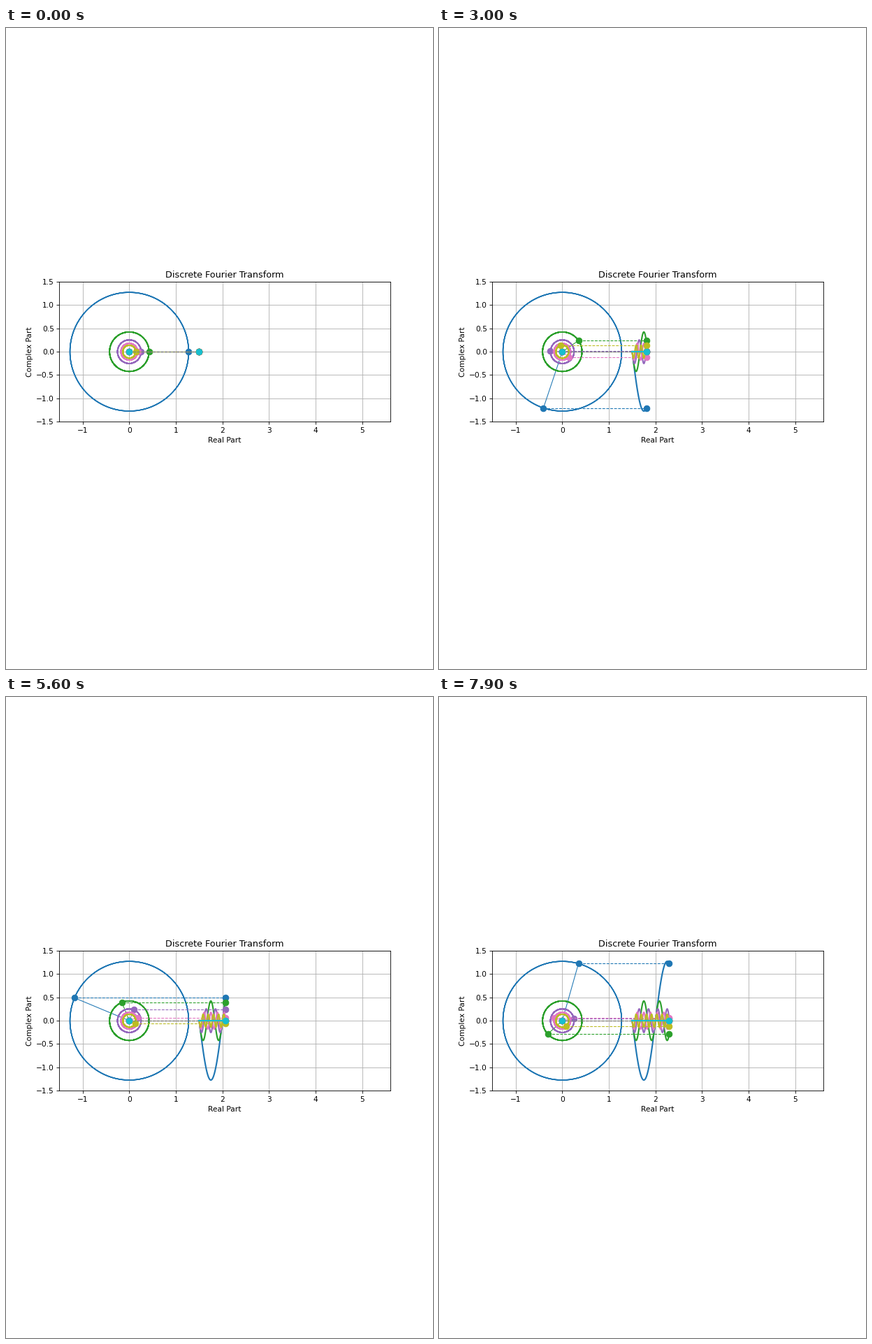
Animation, 611 px wide and 917 px high, one loop 8 s. Source, as a matplotlib script:

```python
import numpy as np
import matplotlib.pyplot as plt
from matplotlib.animation import FuncAnimation

W, H = 611, 917
DPI = W / 8   # an eight inch wide figure
FRAMES, INTERVAL = 80, 100
SAMPLES = 200
OFFSET = 1.5  # where the unrolled waves begin on the real axis
EPS = 1e-6    # keeps the pixel size from truncating

t = np.linspace(0, 2, SAMPLES)

fig, ax = plt.subplots(figsize=((W + EPS) / DPI, (H + EPS) / DPI), dpi=DPI)
ax.set_aspect("equal")
ax.set_xlim(-1.5, 5.6)
ax.set_ylim(-1.5, 1.5)
ax.set_title("Discrete Fourier Transform")
ax.set_xlabel("Real Part")
ax.set_ylabel("Complex Part")
ax.grid(True)


class Harmonic:
    """A rotating phasor with its projected wave."""

    def __init__(self, k):
        amp = 4 / (np.pi * k) if k % 2 else 0
        self.z = amp * np.exp(-2j * np.pi * k * t)
        color = f"C{k - 1}"
        order = 2.2 if k == 10 else 2

        def line(style="-", lw=1.5, zorder=order):
            return ax.plot([], [], style, color=color, lw=lw, ms=8,
                           zorder=zorder)[0]

        line().set_data(self.z.real, self.z.imag)
        self.arm = line(lw=1)
        # the zero-level guide stays above the others
        self.guide = line("--", 1, 2.1 if k == 8 else 2)
        self.wave = line(lw=2)
        self.dots = line("o")

    def update(self, n):
        x, y = self.z[n].real, self.z[n].imag
        head = OFFSET + t[n]
        self.arm.set_data([0, x], [0, y])
        self.guide.set_data([x, head], [y, y])
        self.wave.set_data(OFFSET + t[:n + 1], self.z[:n + 1].imag)
        self.dots.set_data([x, head], [y, y])
        return self.arm, self.guide, self.wave, self.dots


harmonics = [Harmonic(k) for k in range(1, 11)]


def draw(n):
    return [artist for h in harmonics for artist in h.update(n)]


anim = FuncAnimation(fig, draw, frames=FRAMES, interval=INTERVAL,
                     repeat=True, repeat_delay=0, blit=False)
plt.show()
```
